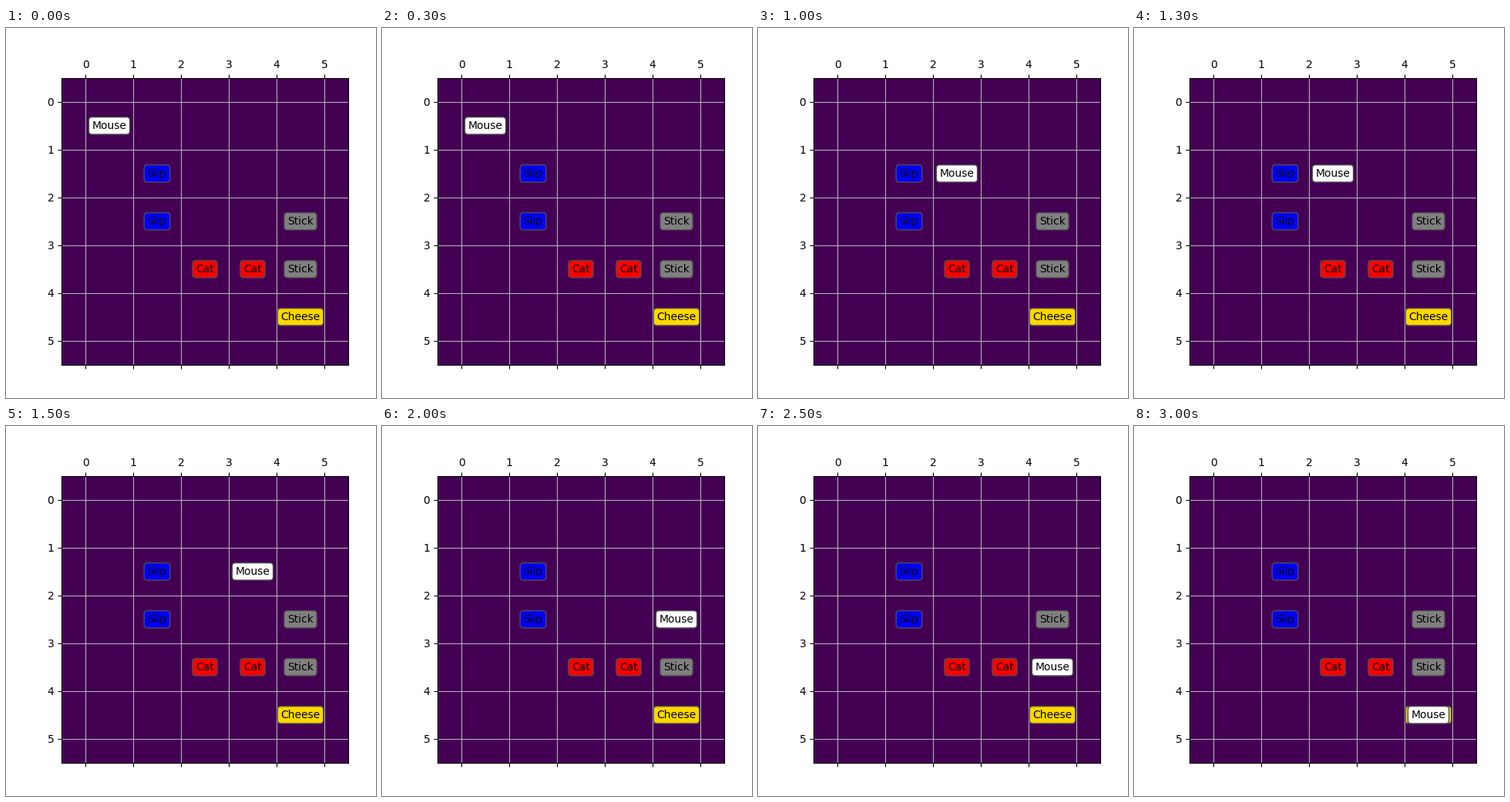
Animation of 480x480 px, one loop 3500 ms. Source, as a matplotlib script:

```python
import numpy as np
import matplotlib.pyplot as plt
from matplotlib.animation import FuncAnimation

SIZE = 6
STEP_MS = 500

# (column, row) cells visited by the mouse
PATH = [(0, 0), (1, 0), (2, 1), (3, 1), (4, 2), (4, 3), (4, 4)]

ITEMS = [
    ("Slip", "blue", [(1, 1), (1, 2)]),
    ("Cat", "red", [(2, 3), (3, 3)]),
    ("Stick", "gray", [(4, 2), (4, 3)]),
    ("Cheese", "gold", [(4, 4)]),
]

fig = plt.figure(figsize=(4.8, 4.8), dpi=100)
ax = fig.add_axes([0.15, 0.09, 0.775, 0.775])
ax.matshow(np.zeros((SIZE, SIZE)), cmap="viridis")
ax.set_xticks(range(SIZE))
ax.set_yticks(range(SIZE))
ax.grid(True)


def add_label(name, color, cell):
    col, row = cell
    box = dict(boxstyle="round", facecolor=color, edgecolor="0.3")
    return ax.text(col + 0.5, row + 0.5, name, ha="center", va="center", bbox=box)


for name, color, cells in ITEMS:
    for cell in cells:
        add_label(name, color, cell)

mouse = add_label("Mouse", "white", PATH[0])
mouse.set_zorder(4)


def update(step):
    col, row = PATH[step]
    mouse.set_position((col + 0.5, row + 0.5))
    return [mouse]


anim = FuncAnimation(fig, update, frames=len(PATH), interval=STEP_MS,
                     repeat=True, repeat_delay=0)
plt.show()
```
